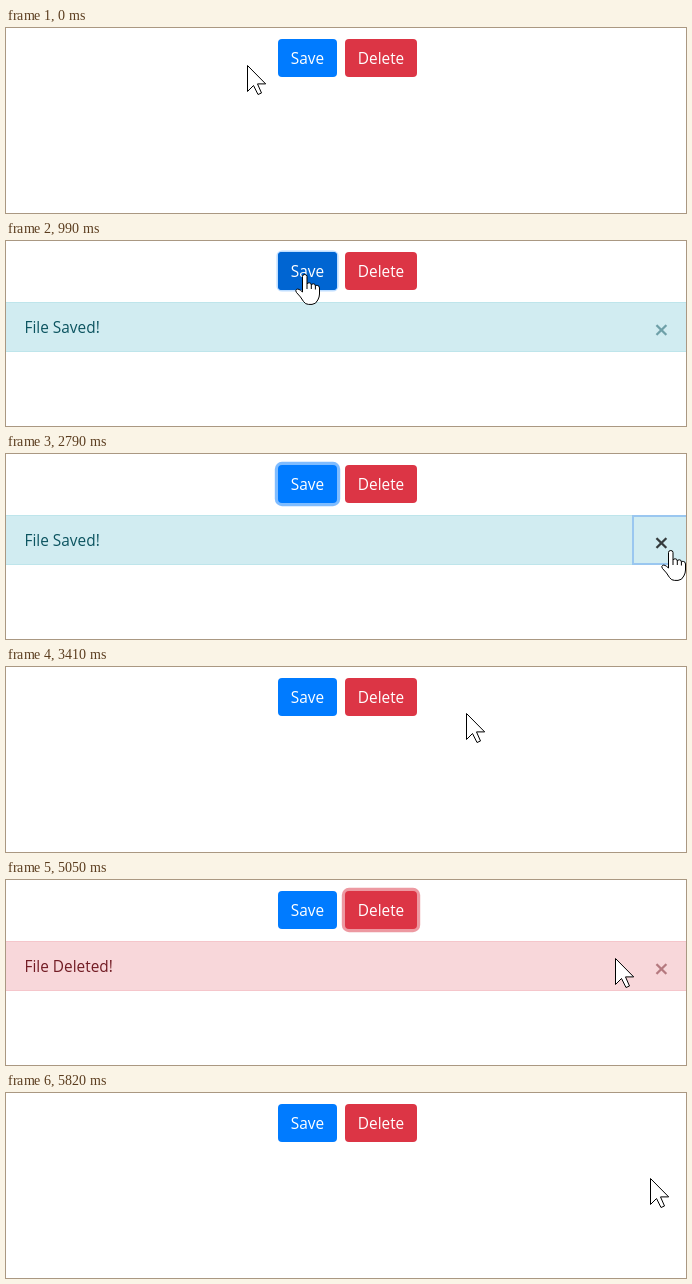
An HTML page with a canvas that plays this animation: 680 by 185 pixels, repeating every 6830 ms.

```html
<!DOCTYPE html>
<html lang="en">
<head>
<meta charset="utf-8">
<title>Dismissible alerts</title>
<style>
  html, body { margin: 0; width: 100%; height: 100%; overflow: hidden; background: #fff; }
  canvas { display: block; }
</style>
</head>
<body>
<canvas id="stage" width="680" height="185"></canvas>
<script>
const ctx = document.getElementById('stage').getContext('2d', { alpha: false });
const LOOP = 6830;
const TICK = 77;  // the picture advances in ticks, not smoothly
const FADE = 75;
const FONT = '"Open Sans", "Noto Sans", sans-serif';
const TEXT = '15.4px ' + FONT;

const START = { x: 241, y: 37 };
const MOVES = [
  { from: 280, to: 440, x: 299, y: 33 },
  { from: 1540, to: 1630, x: 302, y: 36 },
  { from: 1850, to: 2470, x: 665, y: 96, sag: 31 },
  { from: 2867, to: 3410, x: 460, y: 46 },
  { from: 3490, to: 3730, x: 393, y: 32 },
  { from: 4520, to: 5130, x: 626, y: 81, sag: 2 },
  { from: 5210, to: 5360, x: 644, y: 85 }
];

const BUTTONS = [
  {
    label: 'Save', box: [272, 11, 59, 38], shades: ['#007bff', '#0069d9', '#0062cc'],
    enter: 360, click: 990, release: 1540, leave: 1850, blur: 2867
  },
  {
    label: 'Delete', box: [339, 11, 72, 38], shades: ['#dc3545', '#c82333', '#bd2130'],
    enter: 3650, click: 3970, release: 4520, leave: 4520, blur: 5667
  }
];

const ALERTS = [
  { text: 'File Saved!', fill: '#d1ecf1', line: '#bee5eb', ink: '#0c5460', open: 990, press: 2790 },
  { text: 'File Deleted!', fill: '#f8d7da', line: '#f5c6cb', ink: '#721c24', open: 3970, press: 5590 }
];
const CLOSE = [626, 61, 54, 50];

const ARROW = new Path2D('M.5.5V26.5L6.5 20.5L11 29.5L14.5 28L10.5 18.9H18.7Z');
const HAND = new Path2D(
  'M-2.5 18V2.5Q-2.5.5-.2.5Q2 .5 2 2.5V10Q2.5 8.8 4.2 8.8Q6.3 8.8 6.3 11' +
  'Q6.8 9.8 8.4 9.8Q10.4 9.8 10.4 12Q10.9 11.2 12.3 11.4Q14.5 11.7 14.5 14' +
  'V20Q14.5 23 12.8 26Q11 30.2 7 30.4H3.5Q.5 30.4-1.5 27.5Q-4 23-8.6 18.4' +
  'Q-10 16.4-8.3 15.3Q-6.5 14.2-2.5 18Z');
const KNUCKLES = new Path2D('M2 10V15M6.3 11V15M10.4 12V15.5');

const mix = (a, b, k) => a + (b - a) * k;
const inside = ([x, y, w, h], px, py) => px >= x && px < x + w && py >= y && py < y + h;

// Progress from 0 to 1 in whole ticks; the first tick already shows a change.
function progress(t, from, to) {
  if (t < from) return 0;
  if (t >= to) return 1;
  const n = Math.max(1, Math.round((to - from) / TICK));
  const done = Math.floor((t - from) / (to - from) * n + .08);
  return (done + 1) / (n + 1);
}
const fade = (t, from) => progress(t, from, from + FADE);

function pointerAt(t) {
  let { x, y } = START;
  for (const m of MOVES) {
    const k = 1 - (1 - progress(t, m.from, m.to)) ** 1.2;
    x = mix(x, m.x, k);
    y = mix(y, m.y, k) + 4 * (m.sag || 0) * k * (1 - k);
  }
  return { x: Math.round(x), y: Math.round(y) };
}

function roundBox([x, y, w, h], grow, color) {
  ctx.fillStyle = color;
  ctx.beginPath();
  ctx.roundRect(x - grow, y - grow, w + 2 * grow, h + 2 * grow, 4 + grow);
  ctx.fill();
}

function drawButton(b, t) {
  const hover = fade(t, b.enter) - fade(t, b.leave);
  const pressed = fade(t, b.click) - fade(t, b.release);
  const focus = fade(t, b.click) - fade(t, b.blur);
  const [rest, over, down] = b.shades;

  ctx.globalAlpha = .5 * focus;
  roundBox(b.box, 3.2 * focus, rest);
  [[rest, 1], [over, hover], [down, pressed]].forEach(([color, alpha]) => {
    ctx.globalAlpha = alpha;
    roundBox(b.box, 0, color);
  });
  ctx.globalAlpha = 1;
  ctx.font = TEXT;
  ctx.textAlign = 'center';
  ctx.fillStyle = '#fff';
  ctx.fillText(b.label, b.box[0] + b.box[2] / 2, 36);
}

function drawClose(color, alpha) {
  ctx.font = '600 26px ' + FONT;
  ctx.textAlign = 'left';
  const m = ctx.measureText('×');
  const x = 655.5 - (m.actualBoundingBoxRight - m.actualBoundingBoxLeft) / 2;
  const y = 89 + (m.actualBoundingBoxAscent - m.actualBoundingBoxDescent) / 2;
  ctx.globalAlpha *= alpha;
  ctx.fillStyle = color;
  ctx.fillText('×', x, y);
}

function drawAlert(a, t, opacity, hover) {
  ctx.save();
  ctx.globalAlpha = opacity;
  ctx.fillStyle = a.line;
  ctx.fillRect(0, 61, 680, 50);
  ctx.fillStyle = a.fill;
  ctx.fillRect(0, 62, 680, 48);
  ctx.font = TEXT;
  ctx.textAlign = 'left';
  ctx.fillStyle = a.ink;
  ctx.fillText(a.text, 18.5, 92);
  if (t >= a.press) {
    ctx.strokeStyle = '#9ac7f0';
    ctx.lineWidth = 2;
    ctx.strokeRect(627, 62, 54, 48);
  }
  drawClose(hover ? '#000' : a.ink, hover ? .75 : .5);
  ctx.restore();
}

function drawPointer({ x, y }, hand) {
  const shape = hand ? HAND : ARROW;
  ctx.save();
  ctx.translate(x, y);
  ctx.fillStyle = '#fff';
  ctx.strokeStyle = '#000';
  ctx.lineWidth = 1;
  ctx.fill(shape);
  ctx.stroke(shape);
  if (hand) ctx.stroke(KNUCKLES);
  ctx.restore();
}

function draw(t) {
  const p = pointerAt(t);
  let hand = BUTTONS.some(b => inside(b.box, p.x, p.y));

  ctx.fillStyle = '#fff';
  ctx.fillRect(0, 0, 680, 185);
  BUTTONS.forEach(b => drawButton(b, t));
  for (const a of ALERTS) {
    const opacity = 1 - progress(t, a.press + TICK, a.press + 3 * TICK);
    if (t < a.open || opacity === 0) continue;
    const onClose = inside(CLOSE, p.x, p.y);
    drawAlert(a, t, opacity, onClose);
    hand = hand || onClose;
  }
  drawPointer(p, hand);
}

const begin = performance.now();
function frame() {
  draw((performance.now() - begin) % LOOP);
  requestAnimationFrame(frame);
}
frame();
</script>
</body>
</html>
```
